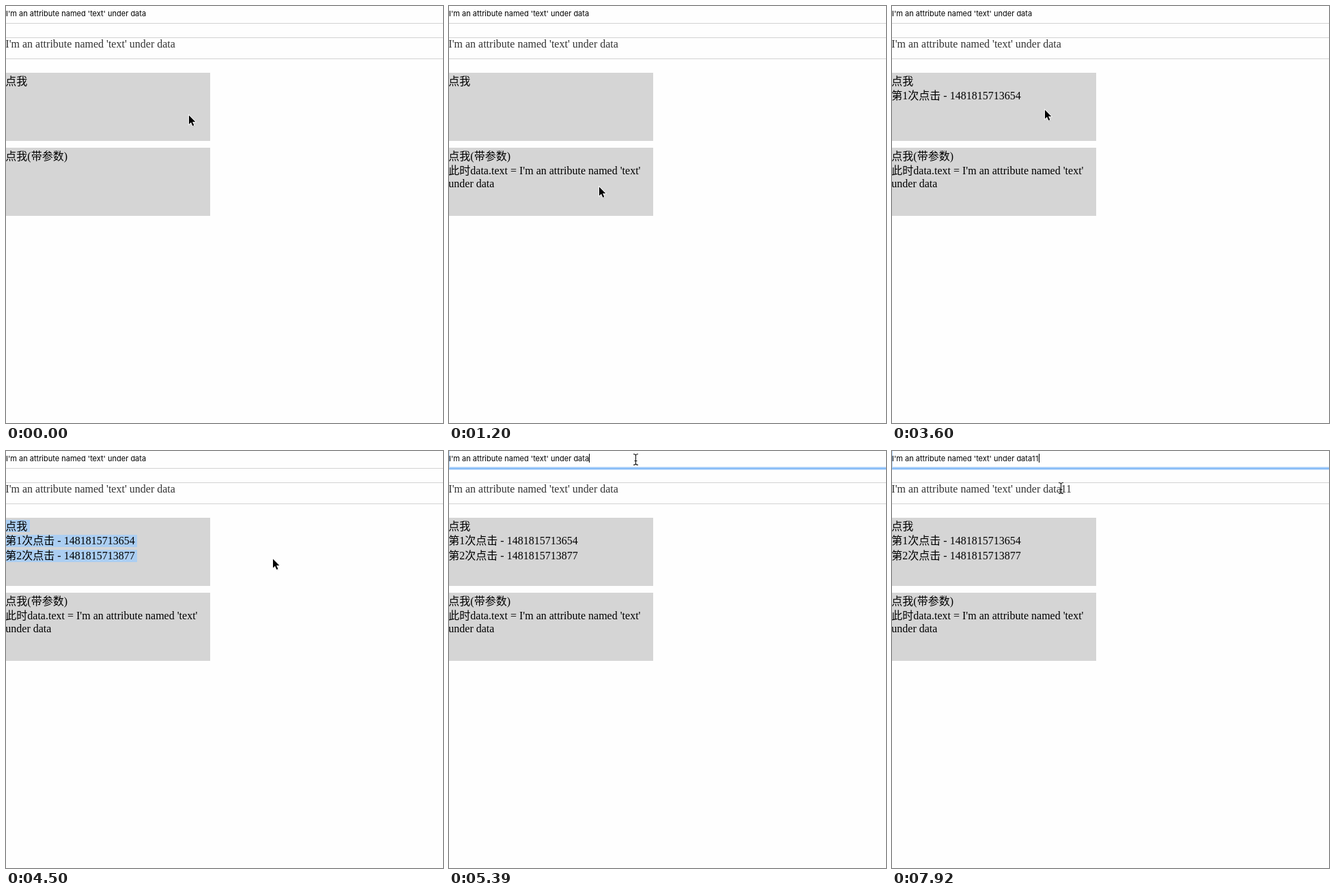
Animation, 640 px wide and 612 px high, one loop 8000 ms. Source, as an HTML page:

```html
<!DOCTYPE html>
<html lang="zh">
<head>
<meta charset="utf-8">
<title>Text binding and clicks</title>
<style>
html, body { margin: 0; width: 100%; height: 100%; overflow: hidden; background: #fefefe; }
svg { display: block; width: 640px; height: 612px; }
text { font: 16px "Liberation Serif", "Noto Sans CJK SC", "Noto Sans CJK", serif; white-space: pre; }
.field { font: 11px Inter, "Open Sans", sans-serif; }
.copy { fill: #333; }
.rule { fill: #d2d2d2; }
.box { fill: #d5d5d5; }
.mark { fill: #abcef2; }

/* Percent = ms / 80; every change is a hard cut. */
.param, .first, .second, .picked, .focus, .one, .two, .caret, .arrow, .beam, .mouse {
  animation: 8s step-end infinite;
}
.param { animation-name: param; }
.first { animation-name: first; }
.second { animation-name: second; }
.picked { animation-name: picked; }
.focus { animation-name: focus; }
.one { animation-name: one; }
.two { animation-name: two; }
.caret { animation-name: caret; }
.arrow { animation-name: arrow; }
.beam { animation-name: beam; }
.mouse { animation-name: move; }

@keyframes param { 0% { opacity: 0 } 15%, 100% { opacity: 1 } }
@keyframes first { 0% { opacity: 0 } 45%, 100% { opacity: 1 } }
@keyframes second { 0% { opacity: 0 } 46.875%, 100% { opacity: 1 } }
@keyframes picked { 0% { opacity: 0 } 46.875% { opacity: 1 } 67.375%, 100% { opacity: 0 } }
@keyframes focus { 0% { opacity: 0 } 67.375%, 100% { opacity: 1 } }
@keyframes one { 0% { opacity: 0 } 73%, 100% { opacity: 1 } }
@keyframes two { 0% { opacity: 0 } 86%, 100% { opacity: 1 } }
@keyframes caret {
  0% { opacity: 0; transform: translateX(205px) }
  67.375% { opacity: 1; transform: translateX(205px) }
  73% { opacity: 1; transform: translateX(210px) }
  80.375% { opacity: 0; transform: translateX(210px) }
  86% { opacity: 1; transform: translateX(215px) }
  93.375% { opacity: 0; transform: translateX(215px) }
  99%, 100% { opacity: 1; transform: translateX(215px) }
}
@keyframes arrow {
  0% { opacity: 1 } 65.625% { opacity: 0 } 73% { opacity: 1 }
  76.75% { opacity: 0 } 78.5% { opacity: 1 } 82.25%, 100% { opacity: 0 }
}
@keyframes beam {
  0% { opacity: 0 } 65.625% { opacity: 1 } 73% { opacity: 0 }
  76.75% { opacity: 1 } 78.5% { opacity: 0 } 82.25%, 100% { opacity: 1 }
}
@keyframes move {
  0% { transform: translate(267px, 159px) }
  1.875% { transform: translate(219px, 169px) }
  5.625% { transform: translate(218px, 188px) }
  7.5% { transform: translate(218px, 222px) }
  9.375% { transform: translate(219px, 252px) }
  11.25% { transform: translate(219px, 264px) }
  35.625% { transform: translate(219px, 252px) }
  37.5% { transform: translate(220px, 206px) }
  39.375% { transform: translate(222px, 166px) }
  41.25% { transform: translate(223px, 151px) }
  52.5% { transform: translate(256px, 139px) }
  54.375% { transform: translate(342px, 146px) }
  56.25% { transform: translate(390px, 157px) }
  60% { transform: translate(380px, 138px) }
  61.875% { transform: translate(340px, 82px) }
  63.75% { transform: translate(294px, 30px) }
  65.625% { transform: translate(273px, 12px) }
  71.125% { transform: translate(271px, 52px) }
  73% { transform: translate(262px, 122px) }
  74.875% { transform: translate(230px, 200px) }
  76.75% { transform: translate(204px, 249px) }
  78.5% { transform: translate(212px, 176px) }
  80.375% { transform: translate(226px, 115px) }
  82.25% { transform: translate(241px, 63px) }
  84.125% { transform: translate(246px, 55px) }
  87.75%, 100% { transform: translate(247px, 54px) }
}
</style>
</head>
<body>
<svg viewBox="0 0 640 612">
  <rect class="rule" y="25" width="640" height="1"/>
  <rect class="rule" y="46" width="640" height="1"/>
  <rect class="rule" y="77" width="640" height="1"/>

  <g class="focus">
    <rect y="23" width="640" height="5" fill="#cfe4fb"/>
    <rect y="24.5" width="640" height="2.2" fill="#7fb7f6"/>
    <rect width="1" height="25" fill="#b9d8fa"/>
  </g>
  <text class="field" y="15">I'm an attribute named 'text' under data</text>
  <text class="field one" x="205" y="15">1</text>
  <text class="field two" x="210" y="15">1</text>
  <rect class="caret" y="4" width="1" height="13"/>

  <text class="copy" x="-.7" y="61">I'm an attribute named 'text' under data</text>
  <text class="copy one" x="247.5" y="61">1</text>
  <text class="copy two" x="255" y="61">1</text>

  <rect class="box" y="98" width="299" height="100"/>
  <g class="picked">
    <rect class="mark" y="101" width="35" height="18"/>
    <rect class="mark" y="123" width="192" height="18"/>
    <rect class="mark" y="145" width="192" height="18"/>
  </g>
  <text x="-.7" y="116">点我</text>
  <text class="first" x="-.7" y="137">第1次点击 - 1481815713654</text>
  <text class="second" x="-.7" y="159">第2次点击 - 1481815713877</text>

  <rect class="box" y="208" width="299" height="100"/>
  <text x="-.7" y="226">点我(带参数)</text>
  <g class="param">
    <text x="-.7" y="247">此时data.text = I'm an attribute named 'text'</text>
    <text x="-.7" y="266">under data</text>
  </g>

  <g class="mouse">
    <g class="arrow">
      <path d="M.6 1.5V16L4 13 6.4 18.4 9.4 17.2 7 11.9H11.4Z" fill="#000" opacity=".2"/>
      <path d="M1 1.4V14.6L4 11.8 6.3 17 8.4 16.1 6.1 10.9H10.3Z" stroke="#fff" stroke-width="1.6" paint-order="stroke"/>
    </g>
    <g class="beam" fill="none">
      <path id="bar" d="M-3 -7.5Q.5 -7.5 .5 -5.5Q.5 -7.5 4 -7.5M.5 -5.5V6.5M-3 8.5Q.5 8.5 .5 6.5Q.5 8.5 4 8.5M-1.5 2.5H2.5" stroke="#fff" stroke-width="2.2" stroke-opacity=".6"/>
      <path d="M-3 -7.5Q.5 -7.5 .5 -5.5Q.5 -7.5 4 -7.5M.5 -5.5V6.5M-3 8.5Q.5 8.5 .5 6.5Q.5 8.5 4 8.5M-1.5 2.5H2.5" stroke="#111" stroke-width="1.1"/>
    </g>
  </g>
</svg>
</body>
</html>
```
